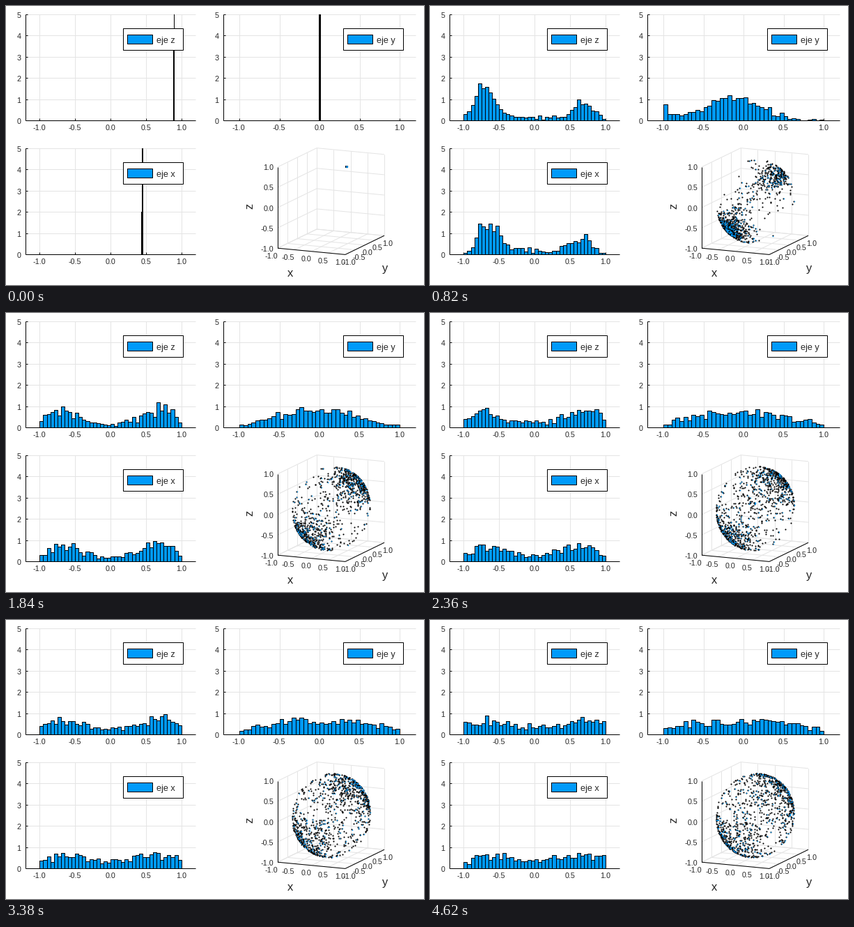
A matplotlib script that plays this animation: 600x400 px, repeating every 4.64 s.

```python
import numpy as np
import matplotlib.pyplot as plt
from matplotlib.animation import FuncAnimation
from matplotlib.collections import LineCollection, PolyCollection
from matplotlib.patches import Rectangle

W, H, DPI = 600, 400, 100
PX = 72 / DPI                     # points per pixel
BLUE, GRID, INK = "#009AFA", "#e4e4e4", "#262626"
STATES, COUNT, BINS = 100, 1000, 40
TICKS = (-1, -0.5, 0, 0.5, 1)
UNIT_H = 30.4                     # pixels per unit of density

plt.rcParams["font.family"] = "Liberation Sans"
fig = plt.figure(figsize=(W / DPI, H / DPI), dpi=DPI, facecolor="white")
ax = fig.add_axes([0, 0, 1, 1])
ax.set_xlim(0, W)
ax.set_ylim(H, 0)
ax.axis("off")


def text(x, y, s, size=10.8, ha="center", **kw):
    ax.text(x, y, s, fontsize=size * PX, ha=ha, va="center_baseline",
            color=INK, **kw)


def lines(segments, color, z):
    ax.add_collection(LineCollection(segments, colors=color,
                                     linewidths=PX, zorder=z), autolim=False)


def box(x, y, w, h, face, z):
    ax.add_patch(Rectangle((x, y), w, h, facecolor=face, edgecolor="black",
                           linewidth=PX, zorder=z))


# ---- ensemble of unit vectors hopping between two opposite poles ----

def ease(u):
    u = np.clip(u, 0, 1)
    return u * u * (3 - 2 * u)


def simulate():
    rng = np.random.default_rng(12)
    start = np.array([1, 0, 2]) / np.sqrt(5)
    pole = np.array([0.68, 0, 0.73])
    scale = np.array([0.8, 1.1, 0.8])
    weight = rng.uniform(0.5, 1.5, COUNT)
    first = rng.uniform(7, 9.5, COUNT)
    leave = rng.uniform(7, 18, COUNT)
    returns = rng.random(COUNT) < 0.54
    noise = rng.standard_normal((COUNT, 3))
    keep = 0.85
    out = []
    for k in range(STATES):
        axis = start + (pole - start) * ease(k / 10)
        turn = np.pi * (ease(k / first) + returns * ease((k - leave) / 5.5))
        pull = weight * (1.35 + 5 * np.exp(-k / 22))
        spread = 0.015 + 0.985 * min(1, k / 16) ** 2
        v = np.cos(turn)[:, None] * axis
        v[:, 1] += np.sin(turn) - 0.15 * ease(k / 10) * np.exp(-k / 30)
        v = v * pull[:, None] + spread * scale * noise
        out.append(v / np.linalg.norm(v, axis=1, keepdims=True))
        noise = keep * noise + np.sqrt(1 - keep ** 2) * rng.standard_normal((COUNT, 3))
    return out


def nice_step(span):
    raw = max(span, 1e-4) / BINS
    base = 10.0 ** np.floor(np.log10(raw))
    for limit, step in ((1.1, 1), (2.2, 2), (5.5, 5)):
        if raw / base <= limit:
            return step * base
    return 10 * base


# ---- histogram panels ----

class Panel:
    def __init__(self, name, left, right, base, legend_x):
        self.mid = (left + right) / 2
        self.unit = (right - left) / 2.4
        self.base = base
        top = base - 5 * UNIT_H
        xs = [self.mid + self.unit * t for t in TICKS]
        ys = [base - UNIT_H * n for n in range(6)]
        lines([[(x, top), (x, base)] for x in xs]
              + [[(left, y), (right, y)] for y in ys], GRID, 1)
        lines([[(left, top), (left, base)], [(left, base), (right, base)]]
              + [[(x, base), (x, base - 3)] for x in xs]
              + [[(left, y), (left + 3, y)] for y in ys], "black", 4)
        for t, x in zip(TICKS, xs):
            text(x - (0.7 if t < 0 else 0), base + 10.5, f"{t:.1f}")
        for n, y in enumerate(ys):
            text(left - 6.5, y + 1, str(n), ha="right")

        self.bars = PolyCollection([], facecolors=BLUE, edgecolors="black",
                                   linewidths=PX, zorder=3)
        ax.add_collection(self.bars, autolim=False)

        y = top + 20
        box(legend_x, y, 86, 31, "white", 6)
        box(legend_x + 6, y + 9, 36, 13, BLUE, 7)
        text(legend_x + 48, y + 16.5, "eje " + name, 12.6, "left", zorder=7)

    def update(self, values):
        step = nice_step(np.ptp(values))
        lo = np.floor(values.min() / step)
        hi = np.floor(values.max() / step) + 1
        edges = np.arange(lo, hi + 0.5) * step
        dens, _ = np.histogram(values, edges, density=True)
        xs = self.mid + self.unit * edges
        b = self.base
        tops = b - UNIT_H * np.minimum(dens, 5)
        self.bars.set_verts([[(l, b), (l, t), (r, t), (r, b)]
                             for l, r, t in zip(xs, xs[1:], tops) if t < b])


# ---- oblique 3D view ----

def project(x, y, z):
    return 466.5 + 48.5 * x + 28 * y, 280 + 4.6 * x - 13.6 * y - 58.2 * z


def seg(a, b):
    return [project(*a), project(*b)]


def draw_space():
    grid = []
    for t in TICKS:
        grid += [seg((t, -1, -1), (t, 1, -1)), seg((-1, t, -1), (1, t, -1)),
                 seg((t, 1, -1), (t, 1, 1)), seg((-1, 1, t), (1, 1, t)),
                 seg((-1, t, -1), (-1, t, 1)), seg((-1, -1, t), (-1, 1, t))]
        label = f"{t:.1f}"
        x, y = project(t, -1, -1)
        text(x, y + 10.5, label, ha="right")
        x, y = project(1, t, -1)
        text(x - 3, y + 10.5, label, ha="left")
        x, y = project(-1, -1, t)
        text(x - 6, y + 0.5, label, ha="right")
    lines(grid, GRID, 1)
    lines([seg((-1, -1, -1), (-1, -1, 1)), seg((-1, -1, -1), (1, -1, -1)),
           seg((1, -1, -1), (1, 1, -1))], "black", 2)
    text(408, 382, "x", 16.5)
    text(544, 374.7, "y", 16.5)
    text(350, 289, "z", 16.5, rotation=90)


def dots(color, size, z):
    return ax.plot([], [], "o", color=color, markersize=size * PX,
                   markeredgewidth=0, zorder=z)[0]


panels = [Panel("z", 28, 272, 164, 168),
          Panel("y", 312, 588, 164, 484),
          Panel("x", 28, 272, 356, 168)]
draw_space()
black = dots("black", 2.1, 5)
blue = dots(BLUE, 1.6, 6)
states = simulate()


def state_at(i):
    # each three states last 20, 100 and 20 ms
    group, r = divmod(i, 7)
    return 3 * group + (0 if r == 0 else 1 if r < 6 else 2)


def update(i):
    x, y, z = states[state_at(i)].T
    for panel, values in zip(panels, (z, y, x)):
        panel.update(values)
    px, py = project(x, y, z)
    black.set_data(px, py)
    blue.set_data(px[::4] + 0.8, py[::4] + 0.3)
    return [p.bars for p in panels] + [black, blue]


anim = FuncAnimation(fig, update, frames=232, interval=20, repeat=True,
                     repeat_delay=0, blit=False)
plt.show()
```
